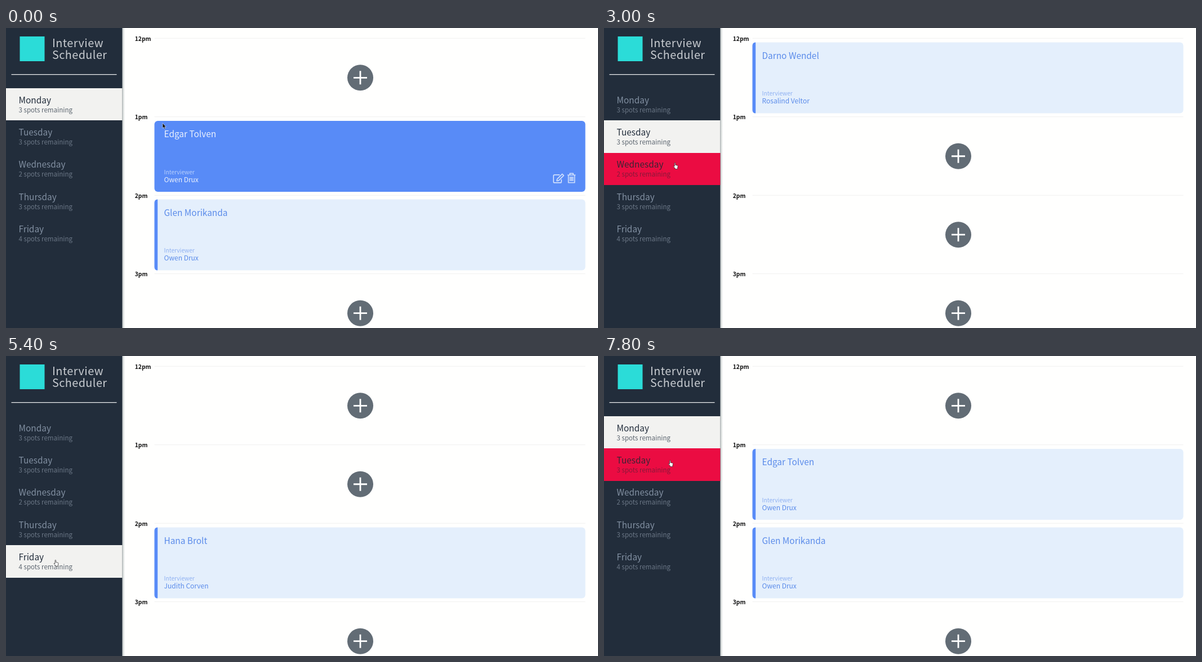
An HTML page that plays this animation: 1051 px wide and 533 px high, repeating every 8000 ms.

```html
<!DOCTYPE html>
<html lang="en">
<head>
<meta charset="utf-8">
<title>Interview Scheduler</title>
<style>
  html, body { margin: 0; width: 100%; height: 100%; overflow: hidden; background: #fffffe; }
  svg { display: block; font-family: "Noto Sans CJK JP", "Noto Sans CJK SC", "Noto Sans CJK", "Open Sans", sans-serif; }
  .title { font-size: 19.8px; font-weight: 300; letter-spacing: .45px; fill: #c9cdd2; }
  .big { font-size: 15.4px; }
  .mid { font-size: 12px; }
  .spots { font-size: 11.55px; font-weight: 300; }
  .small { font-size: 10.2px; font-weight: 300; }
  .time { font-size: 10.3px; font-weight: 700; }
</style>
</head>
<body>
<svg width="1051" height="533" viewBox="0 0 1051 533">
  <defs>
    <linearGradient id="shade">
      <stop stop-color="#4a5c5c" stop-opacity=".38"/>
      <stop offset="1" stop-color="#4a5c5c" stop-opacity="0"/>
    </linearGradient>
  </defs>
  <rect x="206" width="5" height="533" fill="url(#shade)"/>
  <rect width="206.4" height="533" fill="#222d3b"/>
  <rect x="24.5" y="15" width="44" height="44" fill="#2bdcd8"/>
  <text class="title" x="82" y="34.3">Interview</text>
  <text class="title" x="82" y="55">Scheduler</text>
  <path d="M9.5 82.6H196.5" stroke="#eceef0" stroke-width="1.3"/>
  <g id="days"></g>
  <g id="slots"></g>
  <g id="cursor"></g>
</svg>
<script>
const LOOP = 8000, STEP = 100;
const DAY_TOP = 107, DAY_H = 57.35, SLOT_H = 139.45, SIDE_W = 206.4;

// Each day: name, free spots, appointments by slot as [student, interviewer].
const days = [
  ['Monday', 3, { 1: ['Edgar Tolven', 'Owen Drux'], 2: ['Glen Morikanda', 'Owen Drux'] }],
  ['Tuesday', 3, { 0: ['Darno Wendel', 'Rosalind Veltor'] }],
  ['Wednesday', 2, {
    0: ['Noel Varquero', 'Rosalind Veltor'],
    1: ['Petra Halden-Frosk', 'Rosalind Veltor'],
    2: ['Celia Dumovet', 'Stefan Woli'] }],
  ['Thursday', 3, { 0: ['Bruno Kelvaro', 'Stefan Woli'] }],
  ['Friday', 4, { 2: ['Hana Brolt', 'Judith Corven'] }]
];
const hours = ['12pm', '1pm', '2pm', '3pm'];

// Cursor moves: start, end, x, y.
const start = [278, 169];
const moves = [
  [400, 700, 165, 178], [700, 800, 143, 161], [900, 1200, 135.5, 147.5],
  [1500, 2000, 138, 178.5], [2400, 3000, 122.7, 239], [3800, 4000, 114, 280],
  [4100, 4300, 104, 299], [4800, 5100, 84.5, 362], [5600, 6200, 119, 212],
  [6300, 6400, 117.5, 212], [6600, 7000, 114, 148], [7500, 7800, 114, 185]
];
// Clicks: time, selected day.
const clicks = [[0, 0], [2200, 1], [3500, 2], [4500, 3], [5400, 4], [7100, 0]];

const el = id => document.getElementById(id);
const text = (cls, x, y, fill, str) =>
  `<text class="${cls}" x="${x}" y="${y}" fill="${fill}">${str}</text>`;

function cursorAt(t) {
  let [x, y] = start;
  for (const [from, to, toX, toY] of moves) {
    const p = Math.min(1, Math.max(0, (t - from) / (to - from)));
    x += (toX - x) * p;
    y += (toY - y) * p;
  }
  return [x, y];
}

function drawDay([name, spots], i, selected, hovered) {
  const y = DAY_TOP + i * DAY_H;
  const top = Math.round(y), bottom = Math.round(y + DAY_H);
  const [back, ink, soft] =
    i === selected ? ['#f2f2f0', '#222d3b', '#5d6670'] :
    i === hovered ? ['#eb0c42', '#3a2434', '#86193a'] :
    ['none', '#8290a2', '#6b7786'];
  return `<rect y="${top}" width="${SIDE_W}" height="${bottom - top}" fill="${back}"/>` +
    text('big', 22.5, y + 26.6, ink, name) +
    text('spots', 22.5, y + 42.7, soft, `${spots} spots remaining`);
}

function drawIcons(y) {
  return `<g transform="translate(0 ${y - 165})" fill="none" stroke="#cfdffc" stroke-width="1.7" stroke-linejoin="round">
    <path d="M983 261H974q-2 0-2 2v10q0 2 2 2h10q2 0 2-2v-4M978.5 268.5l9-9 2.6 2.6-9 9-3.2.6z"/>
    <path d="M996.8 261.3h14.4M1001 261v-2.5h6v2.5M998.5 261.5v13.3h11v-13.3M1001.6 264v8M1004 264v8M1006.4 264v8"/>
  </g>`;
}

function drawCard([student, interviewer], y, hovered) {
  const blue = '#588bf7';
  const ink = hovered ? '#ebf1fd' : '#5a8bea';
  const soft = hovered ? '#b9d0fc' : '#8fb1f2';
  const front = hovered ? drawIcons(y) :
    `<path d="M269.2 ${y}h-.2q-5.5 0-5.5 6v114q0 6 5.5 6h.2z" fill="${blue}"/>`;
  return `<rect x="263.5" y="${y}" width="765" height="126" rx="6" fill="${hovered ? blue : '#e4effc'}"/>` + front +
    text('big', 280.5, y + 29.5, ink, student) +
    text('small', 280.5, y + 94.6, soft, 'Interviewer') +
    text('mid', 280.5, y + 108.6, ink, interviewer);
}

function drawPlus(y) {
  return `<circle cx="629" cy="${y}" r="23" fill="#626c75"/>
    <path d="M617 ${y}h24M629 ${y - 12}v24" stroke="#fff" stroke-width="2.8"/>`;
}

function drawSlot(hour, i, booked, [x, y]) {
  const top = i * SLOT_H, cardY = top + 25.5;
  const hovered = x > 263 && y > cardY && y < cardY + 126;
  return text('time', 228.8, top + 23, '#111', hour) +
    `<path d="M263.5 ${top + 18.3}h765" stroke="#f0f0ef"/>` +
    (booked ? drawCard(booked, cardY, hovered) : drawPlus(top + 88.3));
}

function drawCursor([x, y]) {
  const shape = x < SIDE_W
    ? '<path d="M2.5 7V1.3Q2.5.5 3.3.5T4.1 1.3V4.4L7.6 5.2Q8.6 5.5 8.5 6.5L7.9 9.2V11.4H3.4V10L.7 7.2Q.5 6 1.5 6.2Z" fill="#fff" stroke="#222" stroke-width=".7"/>'
    : '<path d="M0 0V9L2 7.2 3.4 10.4 4.9 9.7 3.6 6.7H6.2Z" fill="#111" stroke="#e8eefc" stroke-width=".6"/>';
  return `<g transform="translate(${x} ${y})">${shape}</g>`;
}

function draw(t) {
  const pos = cursorAt(t);
  const selected = clicks.filter(c => c[0] <= t).pop()[1];
  const hovered = pos[0] < SIDE_W ? Math.floor((pos[1] - DAY_TOP) / DAY_H) : -1;
  el('days').innerHTML = days.map((d, i) => drawDay(d, i, selected, hovered)).join('');
  el('slots').innerHTML = hours.map((h, i) => drawSlot(h, i, days[selected][2][i], pos)).join('');
  el('cursor').innerHTML = drawCursor(pos);
}

let shown = -1;
function tick() {
  const t = Math.floor(performance.now() % LOOP / STEP) * STEP;
  if (t !== shown) draw(shown = t);
  requestAnimationFrame(tick);
}
tick();
</script>
</body>
</html>
```
